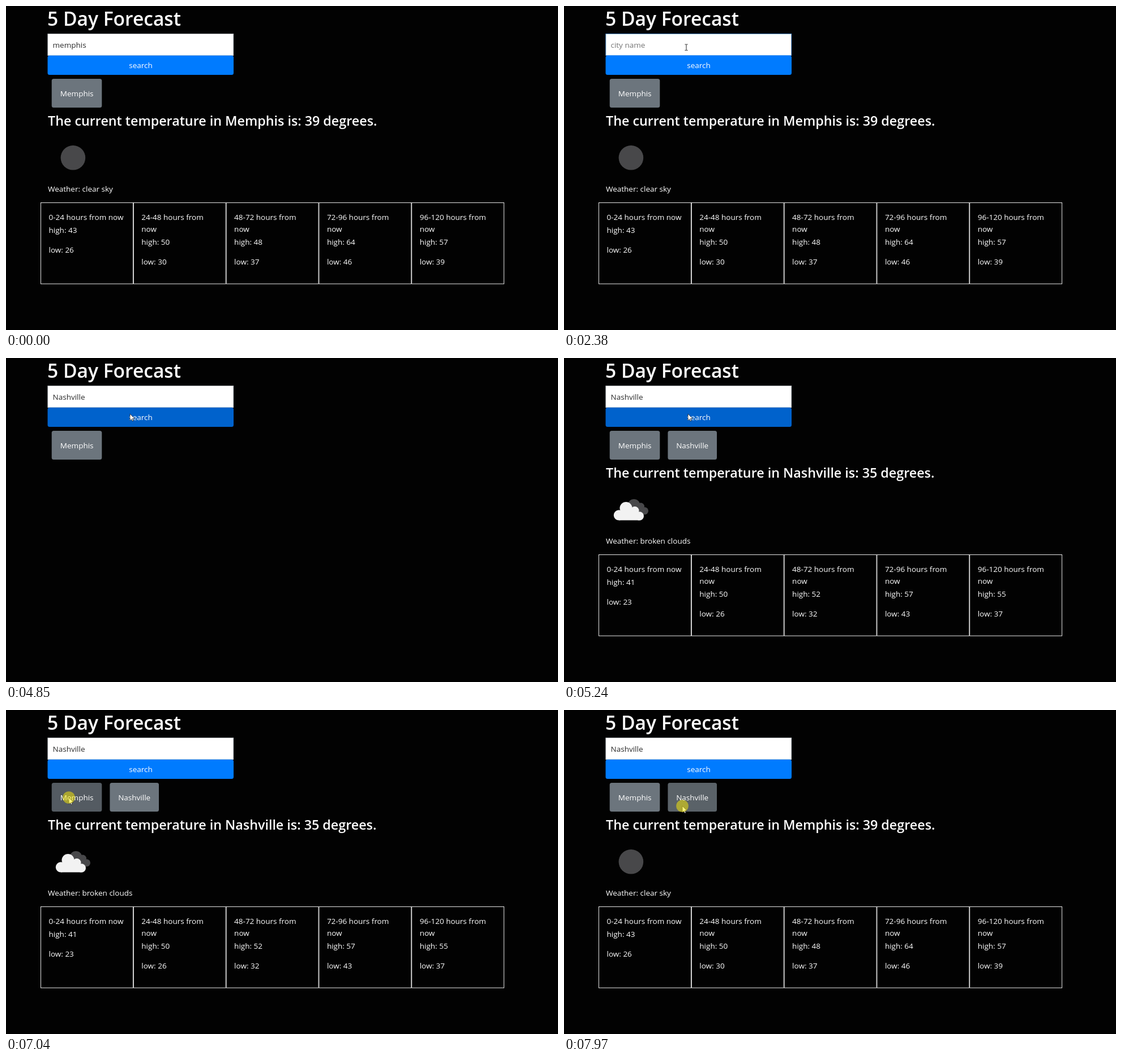
Write an HTML page that moves like this. It is 975 px wide and 574 px high and loops after 8000 ms.

```html
<!DOCTYPE html>
<html lang="en">
<head>
<meta charset="utf-8">
<title>5 Day Forecast</title>
<style>
  html, body { margin: 0; width: 100%; height: 100%; overflow: hidden; background: #020202; }
  svg { display: block; }
  text { font: 500 13.5px "Open Sans", "Noto Sans", sans-serif; fill: #fff; }
  .title { font-size: 33.6px; font-weight: 600; }
  .headline { font-size: 23.3px; font-weight: 600; }
  .cell { fill: none; stroke: #fff; stroke-width: .9; }
</style>
</head>
<body>
<svg width="975" height="574" viewBox="0 0 975 574">
  <text class="title" x="73" y="34.6">5 Day Forecast</text>

  <rect id="field" x="73.9" y="49.4" width="327.7" height="38.2" fill="#fff" stroke-width=".9"/>
  <rect id="selection" x="83" y="59" height="19" fill="#0078d7"/>
  <text id="query" x="82.5" y="74"></text>
  <rect id="caret" y="59" width="1" height="19" fill="#111"/>

  <rect id="search" x="73.5" y="87.8" width="328.5" height="34.2" rx="3.5"/>
  <text x="238" y="110.4" text-anchor="middle">search</text>

  <rect id="memphis" x="80.7" y="129" width="88.6" height="51" rx="3.5"/>
  <text x="125.2" y="160" text-anchor="middle">Memphis</text>
  <g id="second">
    <rect id="nashville" x="183.4" y="129" width="86.6" height="51" rx="3.5"/>
    <text x="226.7" y="160" text-anchor="middle">Nashville</text>
  </g>

  <g id="forecast">
    <text id="headline" class="headline" x="74" y="212"></text>
    <circle id="moon" cx="118.4" cy="268.8" r="21.8" fill="#48484a"/>
    <g id="clouds">
      <g fill="#48484a">
        <circle cx="123.5" cy="261" r="11"/>
        <circle cx="135.5" cy="263" r="6.5"/>
        <circle cx="142.5" cy="270.8" r="6.5"/>
        <path d="M122 262H140L143 277.3H122Z"/>
      </g>
      <g fill="#f2f2f2">
        <circle cx="97" cy="278.4" r="9.2"/>
        <circle cx="109.5" cy="266" r="11"/>
        <circle cx="125" cy="270.5" r="7.5"/>
        <circle cx="133.3" cy="280" r="7.7"/>
        <path d="M97 287.6V272L109 266H122L133 274V287.6Z"/>
      </g>
    </g>
    <text id="weather" x="74" y="329"></text>
    <g id="cells"></g>
  </g>

  <g id="pointer">
    <path id="arrow" d="M0 0V11.4L2.6 9 4.4 13 6.2 12.2 4.5 8.3H8Z" fill="#fff" stroke="#111" stroke-width=".7"/>
    <path id="beam" d="M-2.5 -5H-.6L0 -4.5.6 -5H2.5M0 -4.5V5M-2.5 5.5H-.6L0 5 .6 5.5H2.5" fill="none" stroke="#222"/>
    <circle id="halo" r="10.8" fill="#fff000" opacity=".5"/>
  </g>
</svg>
<script>
const LOOP = 8000;
const $ = id => document.getElementById(id);
const show = (id, on) => $(id).style.display = on ? '' : 'none';
const fill = (id, color) => $(id).style.fill = color;
const within = (t, spans) => spans.some(([from, to]) => t >= from && t < to);

const CITIES = {
  Memphis: { temp: 39, weather: 'clear sky', high: [43, 50, 48, 64, 57], low: [26, 30, 37, 46, 39] },
  Nashville: { temp: 35, weather: 'broken clouds', high: [41, 50, 52, 57, 55], low: [23, 26, 32, 43, 37] },
};

// time, x, y
const PATH = [
  [200, 646, 398], [270, 480, 262], [350, 364, 166], [600, 354, 161],
  [780, 270, 112], [980, 217, 74], [1130, 216, 73], [4160, 216, 73],
  [4400, 218, 86], [4700, 219, 99], [6180, 219, 99], [6250, 219, 108],
  [6420, 220, 126], [6650, 185, 146], [6960, 111, 155], [7420, 111, 155],
  [7890, 209, 170], [8000, 209, 170],
];
const CLICKS = [[1130, 1210], [1280, 1360], [4700, 4850], [7040, 7180], [7970, 8000]];
const KEYS = [2530, 2850, 2925, 3000, 3150, 3230, 3310, 3540, 3610];

function pointerAt(t) {
  const next = PATH.findIndex(p => p[0] > t);
  if (next < 1) return null;
  const [t0, x0, y0] = PATH[next - 1], [t1, x1, y1] = PATH[next];
  const k = (t - t0) / (t1 - t0);
  return { x: x0 + (x1 - x0) * k, y: y0 + (y1 - y0) * k };
}

function hovers(id, p) {
  const r = $(id), v = name => +r.getAttribute(name);
  return p && p.x >= v('x') && p.x < v('x') + v('width') && p.y >= v('y') && p.y < v('y') + v('height');
}

let shownCity;
function fillForecast(name) {
  if (name === shownCity) return;
  shownCity = name;
  const city = CITIES[name];
  $('headline').textContent = `The current temperature in ${name} is: ${city.temp} degrees.`;
  $('weather').textContent = `Weather: ${city.weather}`;
  $('cells').innerHTML = city.high.map((high, i) => {
    const left = 61.5 + 163.8 * i, drop = i ? 21.3 : 0;
    const line = (y, s) => `<text x="${left + 14}" y="${y}">${s}</text>`;
    const range = `${24 * i}-${24 * i + 24} hours from`;
    return `<rect class="cell" x="${left}" y="348.5" width="162.9" height="143.7"/>`
      + (i ? line(379, range) + line(400, 'now') : line(379, range + ' now'))
      + line(402 + drop, 'high: ' + high) + line(437 + drop, 'low: ' + city.low[i]);
  }).join('');
}

function drawField(t) {
  const typed = 'Nashville'.slice(0, KEYS.filter(k => k <= t).length);
  const empty = t >= 1820 && !typed;
  const selected = t >= 1280 && t < 1820;
  const focused = t >= 1130 && t < 4700;
  const query = $('query');
  query.textContent = t < 1820 ? 'memphis' : typed || 'city name';
  fill('query', selected ? '#fff' : empty ? '#757575' : '#2b2b2b');
  const width = query.getComputedTextLength();
  $('field').setAttribute('stroke', focused ? '#66a9f5' : '#ced4da');
  $('selection').setAttribute('width', width);
  show('selection', selected);
  $('caret').setAttribute('x', empty ? 83 : 83 + width);
  show('caret', within(t, [[1130, 1280], [1820, 2380], [2530, 4160]]));
}

function drawPointer(p, clicking) {
  show('pointer', p);
  if (!p) return;
  const typing = hovers('field', p);
  $('pointer').setAttribute('transform', `translate(${p.x} ${p.y})`);
  show('arrow', !typing);
  show('beam', typing);
  show('halo', clicking);
}

function draw(t) {
  const p = pointerAt(t), clicking = within(t, CLICKS);
  drawField(t);
  fill('search', t >= 4700 && t < 6250 ? '#0062cc' : hovers('search', p) ? '#0069d9' : '#007bff');
  fill('memphis', !hovers('memphis', p) ? '#6c757d' : clicking ? '#545b62' : '#5a6268');
  fill('nashville', hovers('nashville', p) ? '#5a6268' : '#6c757d');
  show('second', t >= 5160);

  const nashville = t >= 4850 && t < 7180;
  fillForecast(nashville ? 'Nashville' : 'Memphis');
  show('forecast', !within(t, [[4850, 5160], [7180, 7490]]));
  show('moon', !nashville);
  show('clouds', nashville && t >= 5240);
  drawPointer(p, clicking);
}

function tick() {
  draw(performance.now() % LOOP);
  requestAnimationFrame(tick);
}
tick();
</script>
</body>
</html>
```
